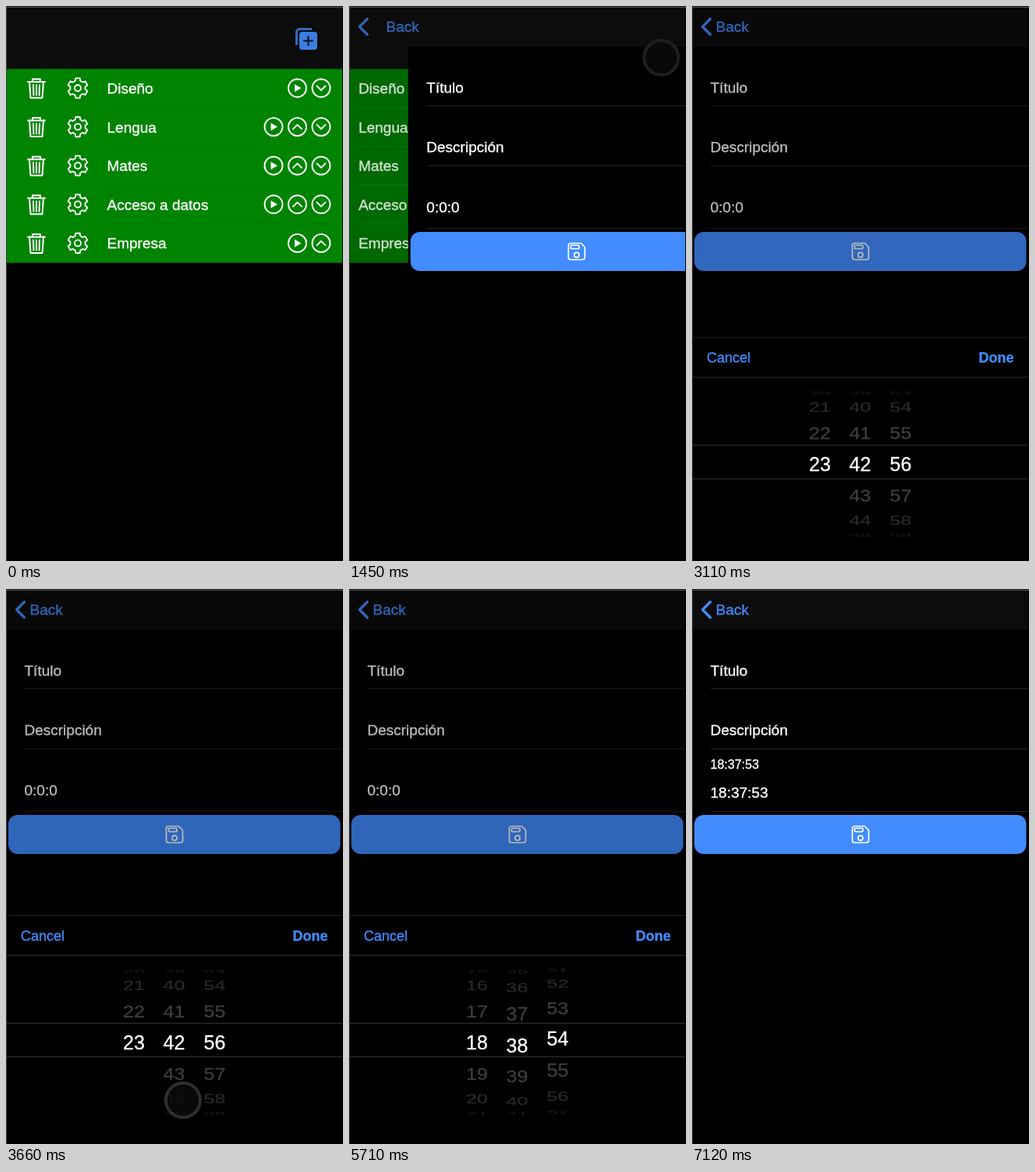
An HTML page with a canvas for the animation above (7.17 s loop, 432 by 710 pixels).

```html
<!DOCTYPE html>
<html lang="es">
<head>
<meta charset="utf-8">
<title>Temporizadores</title>
<style>
html, body { margin: 0; width: 100%; height: 100%; overflow: hidden; background: #000; }
canvas { display: block; width: 432px; height: 710px; }
</style>
</head>
<body>
<canvas id="stage" width="432" height="710"></canvas>
<script>
const W = 432, H = 710, LOOP = 7170;
const ctx = document.getElementById('stage').getContext('2d');
const FONT = '"Liberation Sans", Arial, sans-serif';
const INK = '#fff', BLUE = '#428cff', BAR = '#0c0c0d';
const ROWS = ['Diseño', 'Lengua', 'Mates', 'Acceso a datos', 'Empresa'];

const clamp = v => Math.max(0, Math.min(1, v));
const mix = (a, b, p) => a + (b - a) * p;
const span = (t, start, length) => clamp((t - start) / length);
const easeOut = (p, power) => 1 - Math.pow(1 - p, power);

function bezier(x1, y1, x2, y2) {
  const at = (a, b, u) => 3 * a * u * (1 - u) ** 2 + 3 * b * u * u * (1 - u) + u ** 3;
  return x => {
    let lo = 0, hi = 1;
    for (let i = 0; i < 24; i++) {
      const mid = (lo + hi) / 2;
      if (at(x1, x2, mid) < x) lo = mid; else hi = mid;
    }
    return x <= 0 ? 0 : x >= 1 ? 1 : at(y1, y2, hi);
  };
}
const pageEase = bezier(0.32, 0.72, 0, 1);
const sheetEase = bezier(0.36, 0.66, 0.04, 1);

function rect(x, y, w, h, color) {
  ctx.fillStyle = color;
  ctx.fillRect(x, y, w, h);
}

// A hairline outline gives the slightly heavy look of screen text.
function text(str, x, y, size = 19, color = INK, weight = '', align = 'left') {
  ctx.font = `${weight} ${size}px ${FONT}`;
  ctx.textAlign = align;
  ctx.fillStyle = ctx.strokeStyle = color;
  ctx.lineWidth = 0.35;
  ctx.fillText(str, x, y);
  ctx.strokeText(str, x, y);
}

function line(...points) {
  ctx.beginPath();
  for (let i = 0; i < points.length; i += 2) ctx.lineTo(points[i], points[i + 1]);
  ctx.stroke();
}

function ring(x, y, r) {
  ctx.beginPath();
  ctx.arc(x, y, r, 0, Math.PI * 2);
  ctx.stroke();
}

function box(x, y, w, h, r) {
  ctx.beginPath();
  ctx.roundRect(x, y, w, h, r);
}

// Runs draw with the origin moved and the alpha scaled.
function group(x, y, alpha, draw) {
  ctx.save();
  ctx.translate(x, y);
  ctx.globalAlpha *= alpha;
  draw();
  ctx.restore();
}

function pen(width) {
  ctx.strokeStyle = INK;
  ctx.lineWidth = width;
  ctx.lineCap = ctx.lineJoin = 'round';
}

function trash(x, y) {
  group(x, y, 1, () => {
    pen(2);
    line(-11, -8, 11, -8);
    line(-5, -8, -5, -11.5, 5, -11.5, 5, -8);
    line(-9, -8, -7.5, 12.5, 7.5, 12.5, 9, -8);
    for (const k of [-1, 0, 1]) line(k * 4, -4, k * 3.6, 9);
  });
}

function gear(x, y) {
  group(x, y, 1, () => {
    pen(1.9);
    ctx.beginPath();
    for (let i = 0; i < 6; i++) {
      const a = i * Math.PI / 3 - Math.PI / 2;
      for (const [da, r] of [[-0.34, 9.8], [-0.22, 12.9], [0.22, 12.9], [0.34, 9.8]])
        ctx.lineTo(r * Math.cos(a + da), r * Math.sin(a + da));
    }
    ctx.closePath();
    ctx.stroke();
    ring(0, 0, 4);
  });
}

function control(kind, x, y) {
  group(x, y, 1, () => {
    pen(1.9);
    ring(0, 0, 11.5);
    if (kind === 'play') {
      ctx.fillStyle = INK;
      ctx.beginPath();
      ctx.moveTo(-3.5, -5);
      ctx.lineTo(5, 0);
      ctx.lineTo(-3.5, 5);
      ctx.fill();
    } else {
      const s = kind === 'up' ? 1 : -1;
      line(-5.5, 2.7 * s, 0, -2.7 * s, 5.5, 2.7 * s);
    }
  });
}

function addIcon() {
  ctx.strokeStyle = '#3069bd';
  ctx.lineWidth = 3;
  ctx.lineCap = 'butt';
  ctx.beginPath();
  ctx.moveTo(372.5, 50);
  ctx.arcTo(372.5, 29.5, 392, 29.5, 4);
  ctx.lineTo(392, 29.5);
  ctx.stroke();
  ctx.fillStyle = '#3b7de0';
  box(376, 33, 23, 23, 4);
  ctx.fill();
  ctx.strokeStyle = '#0b1220';
  ctx.lineWidth = 2;
  ctx.lineCap = 'round';
  line(382, 44.5, 393, 44.5);
  line(387.5, 39, 387.5, 50);
}

function saveIcon(x, y) {
  group(x, y, 1, () => {
    pen(1.7);
    ctx.beginPath();
    ctx.moveTo(-7, -10.5);
    ctx.lineTo(5.5, -10.5);
    ctx.lineTo(10.5, -5.5);
    ctx.arcTo(10.5, 10.5, 0, 10.5, 3);
    ctx.arcTo(-10.5, 10.5, -10.5, 0, 3);
    ctx.arcTo(-10.5, -10.5, -7, -10.5, 3);
    ctx.closePath();
    ctx.stroke();
    box(-7.5, -8, 10.5, 4.5, 1);
    ctx.stroke();
    ring(0, 4.5, 3.1);
  });
}

function listPage() {
  rect(0, 80.5, W, 248, '#008400');
  ROWS.forEach((name, i) => {
    const y = 105 + i * 49.6;
    trash(39, y);
    gear(92, y);
    text(name, 129.5, y + 7);
    const kinds = ['play'];
    if (i > 0) kinds.push('up');
    if (i < ROWS.length - 1) kinds.push('down');
    kinds.reverse().forEach((kind, k) => control(kind, 404 - k * 30.5, y));
    if (i < ROWS.length - 1) rect(130, Math.round(y + 24), W - 130, 1, '#007c00');
  });
}

function formPage(t) {
  rect(0, 52, W, H - 52, '#000');
  text('Título', 23.5, 111);
  text('Descripción', 23.5, 187);
  for (const y of [127, 204, 284]) rect(24, y, W, 1, '#242424');
  if (t < 6400) {
    text('0:0:0', 23.5, 264);
  } else {
    const p = easeOut(span(t, 6400, 150), 2);
    text('18:37:53', 23.5, mix(264, 230, p), mix(19, 16, p));
    group(0, 0, p, () => text('18:37:53', 23.5, 267));
  }
  ctx.fillStyle = BLUE;
  box(3, 289, 425.5, 50, 12);
  ctx.fill();
  saveIcon(216, 314);
}

function header(p) {
  group(0, 0, clamp(1 - p * 1.3), addIcon);
  if (p <= 0) return;
  group(0, 0, p * p, () => {
    ctx.strokeStyle = BLUE;
    ctx.lineWidth = 3.2;
    ctx.lineCap = ctx.lineJoin = 'round';
    line(23.5, 16.5, 13.5, 26.5, 23.5, 36.5);
    text('Back', 30.5 + 97 * (1 - p), 33, 19, BLUE);
  });
}

// Numbers on the face of a turning cylinder.
function wheel(x, value, max) {
  const R = 94, STEP = 0.44;
  const chosen = Math.round(value);
  const shades = [INK, '#3d3d3d', '#2a2a2a', '#191919'];
  for (let n = chosen - 4; n <= chosen + 4; n++) {
    const angle = (n - value) * STEP;
    if (n < 0 || n > max || Math.abs(angle) > 1.45) continue;
    ctx.save();
    ctx.translate(x, 579.5 + R * Math.sin(angle));
    ctx.scale(1, Math.cos(angle));
    text(String(n), 0, 9, 25, shades[Math.min(3, Math.abs(n - chosen))], '', 'center');
    ctx.restore();
  }
}

function sheet(t, open) {
  rect(0, 2, W, H, `rgba(0,0,0,${0.27 * open})`);
  group(0, 293 * (1 - open), 1, () => {
    rect(0, 417, W, 293, '#000');
    rect(0, 417, W, 1, '#202020');
    rect(0, 468, W, 1, '#2c2c2c');
    text('Cancel', 19, 450, 18, BLUE);
    text('Done', 412.5, 450, 18, BLUE, 'bold', 'right');
    wheel(164, 23 - 5 * easeOut(span(t, 3850, 1050), 2.5), 23);
    wheel(215.5, 42 - 5 * easeOut(span(t, 5050, 1146), 2), 59);
    wheel(267.5, 56 - 3 * easeOut(span(t, 5400, 787), 2), 59);
    rect(0, 555, W, 1, '#333');
    rect(0, 598, W, 1, '#333');
  });
}

// Pointer stretches: start, end, from x, y, to x, y.
const TOUCHES = [
  [900, 1250, 372, 150, 386, 44],
  [1250, 1560, 386, 44, 408, 78],
  [3480, 3840, 236, 668, 218, 640],
];

function pointer(t) {
  const touch = TOUCHES.find(([a, b]) => t >= a && t < b);
  if (!touch) return;
  const [a, b, x0, y0, x1, y1] = touch;
  const p = (t - a) / (b - a);
  const x = mix(x0, x1, p), y = mix(y0, y1, p);
  ctx.beginPath();
  ctx.arc(x, y, 22, 0, Math.PI * 2);
  ctx.fillStyle = 'rgba(12,12,12,0.8)';
  ctx.fill();
  ctx.strokeStyle = t > 3000 ? '#2e2e2e' : '#1f1f1f';
  ctx.lineWidth = 4;
  ring(x, y, 22);
}

function draw(t) {
  const p = pageEase(span(t, 1300, 540));
  const open = sheetEase(span(t, 2850, 400)) * (1 - sheetEase(span(t, 6380, 400)));
  rect(0, 0, W, H, '#000');
  if (p < 1) {
    rect(0, 0, W, 80.5, BAR);
    group(-142.5 * p, 0, 1 - 0.25 * p, listPage);
  }
  if (p > 0) {
    group(430 * (1 - p), 0, 1, () => formPage(t));
    rect(0, 0, W, 52, BAR);
  }
  header(p);
  if (open > 0) sheet(t, open);
  rect(W - 1, 0, 1, H, '#000');
  rect(0, 1, W, 1, '#5e5e5e');
  rect(0, 1, 1, H, '#404040');
  pointer(t);
}

const began = performance.now();
function tick() {
  draw((performance.now() - began) % LOOP);
  requestAnimationFrame(tick);
}
tick();
</script>
</body>
</html>
```
